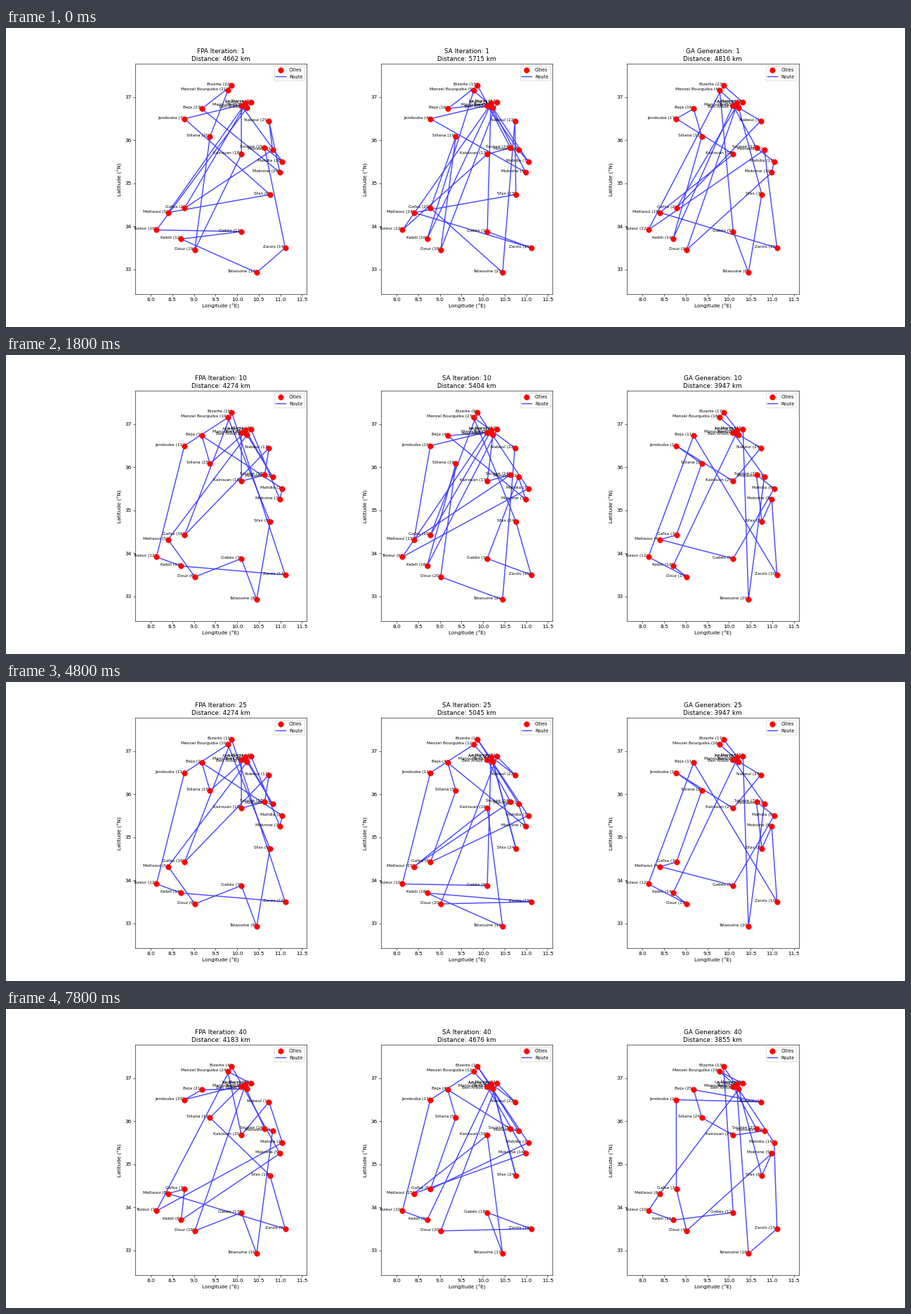
Animation of 1280x427 px, one loop 8000 ms. Source, as a matplotlib script:

```python
import matplotlib.pyplot as plt
from matplotlib.animation import FuncAnimation

STEPS, INTERVAL = 40, 200
DPI = 160 / 3

# key: (name, longitude, latitude)
CITIES = {
    "Tun": ("Tunis", 10.1815, 36.8065),
    "Ari": ("Ariana", 10.1956, 36.8625),
    "Mar": ("La Marsa", 10.3247, 36.8782),
    "Man": ("Manouba", 10.0956, 36.8101),
    "Ben": ("Ben Arous", 10.2300, 36.7531),
    "Biz": ("Bizerte", 9.8739, 37.2744),
    "Men": ("Menzel Bourguiba", 9.7856, 37.1536),
    "Bej": ("Beja", 9.1833, 36.7333),
    "Jen": ("Jendouba", 8.7803, 36.5011),
    "Nab": ("Nabeul", 10.7376, 36.4513),
    "Sil": ("Siliana", 9.3708, 36.0844),
    "Sou": ("Sousse", 10.6369, 35.8256),
    "Mon": ("Monastir", 10.8200, 35.7780),
    "Kai": ("Kairouan", 10.0990, 35.6781),
    "Mah": ("Mahdia", 11.0456, 35.5047),
    "Mok": ("Moknine", 10.9900, 35.2530),
    "Sfa": ("Sfax", 10.7603, 34.7406),
    "Gaf": ("Gafsa", 8.7842, 34.4250),
    "Met": ("Metlaoui", 8.4016, 34.3230),
    "Toz": ("Tozeur", 8.1335, 33.9197),
    "Keb": ("Kebili", 8.7050, 33.7080),
    "Dou": ("Douz", 9.0203, 33.4567),
    "Gab": ("Gabès", 10.0982, 33.8815),
    "Zar": ("Zarzis", 11.1122, 33.5039),
    "Tat": ("Tataouine", 10.4518, 32.9297),
}

# Best tours per solver: (first step, distance in km, visiting order)
FPA = [
    (1, 4662, "Mon Gaf Tun Ari Met Sfa Jen Mar Ben Toz Gab Keb Tat "
              "Zar Sou Mah Man Kai Dou Sil Men Biz Bej Mok Nab"),
    (3, 4479, "Mah Mok Toz Keb Sil Biz Gaf Met Tun Zar Man Sfa Sou "
              "Mon Gab Tat Dou Ari Nab Jen Bej Ben Men Mar Kai"),
    (7, 4274, "Bej Mah Mok Mar Met Dou Gab Tat Sfa Men Jen Toz Keb "
              "Zar Biz Gaf Nab Sou Kai Man Ari Mon Ben Tun Sil"),
    (36, 4183, "Nab Mah Toz Biz Mok Keb Gaf Met Zar Sfa Sil Man Tun "
               "Sou Mon Tat Gab Dou Ari Jen Bej Ben Mar Men Kai"),
]
SA = [
    (1, 5715, "Gab Tun Mok Jen Man Mon Mah Ben Men Keb Ari Toz Kai "
              "Sou Biz Bej Mar Dou Sil Gaf Tat Nab Sfa Met Zar"),
    (3, 5550, "Gab Tun Mok Jen Man Mon Mah Ben Men Keb Ari Toz Kai "
              "Sou Biz Bej Mar Gaf Sil Dou Tat Nab Sfa Met Zar"),
    (7, 5404, "Gab Mon Mok Bej Man Toz Mah Tun Biz Gaf Ari Ben Kai "
              "Sou Met Jen Mar Keb Sil Dou Tat Nab Men Sfa Zar"),
    (16, 5392, "Gab Mon Mok Bej Man Toz Mah Tun Biz Gaf Ari Ben Kai "
               "Sou Met Jen Tat Keb Sil Dou Mar Nab Men Sfa Zar"),
    (24, 5045, "Biz Mon Mok Bej Sil Gaf Mah Tun Gab Toz Jen Men Man "
               "Sou Met Kai Tat Keb Zar Dou Mar Nab Ari Sfa Ben"),
    (36, 4676, "Biz Mon Sou Bej Sil Gaf Mah Tun Keb Toz Jen Men Man "
               "Mok Met Kai Tat Gab Zar Dou Mar Nab Ari Sfa Ben"),
]
GA = [
    (1, 4816, "Nab Gaf Tun Men Gab Tat Sfa Ari Dou Mok Mah Sou Man "
              "Keb Sil Bej Jen Kai Met Zar Mon Toz Biz Mar Ben"),
    (3, 4303, "Biz Ben Bej Sil Tat Gaf Gab Mar Met Toz Keb Sfa Nab "
              "Tun Dou Zar Jen Man Men Ari Sou Mah Kai Mok Mon"),
    (8, 3947, "Jen Sil Gaf Met Gab Mah Sou Sfa Mok Zar Bej Toz Dou "
              "Keb Tun Men Biz Ari Mar Tat Mon Man Ben Nab Kai"),
    (30, 3855, "Nab Jen Gaf Dou Mok Sfa Ari Ben Met Toz Keb Gab Biz "
               "Mah Zar Tat Tun Men Mar Man Sou Mon Kai Sil Bej"),
]

LONS = [c[1] for c in CITIES.values()]
LATS = [c[2] for c in CITIES.values()]


class Panel:
    def __init__(self, ax, heading, tours):
        self.ax, self.heading, self.tours = ax, heading, tours
        ax.scatter(LONS, LATS, c="red", s=100, label="Cities", zorder=5)
        self.line, = ax.plot([], [], "b-", lw=2, alpha=0.7, label="Route")
        self.labels = {key: ax.text(lon, lat, name, fontsize=8, ha="right")
                       for key, (name, lon, lat) in CITIES.items()}
        ax.set_xlim(min(LONS) - 0.5, max(LONS) + 0.5)
        ax.set_ylim(min(LATS) - 0.5, max(LATS) + 0.5)
        ax.set_xticks([8 + 0.5 * i for i in range(8)])
        ax.set_yticks(range(33, 38))
        ax.set_aspect("equal")
        ax.set_xlabel("Longitude (°E)")
        ax.set_ylabel("Latitude (°N)")
        ax.legend(loc="upper right", fontsize=9)

    def show(self, step):
        _, km, order = [t for t in self.tours if t[0] <= step][-1]
        keys = order.split()
        loop = keys + keys[:1]
        self.line.set_data([CITIES[k][1] for k in loop],
                           [CITIES[k][2] for k in loop])
        for rank, key in enumerate(keys, 1):
            self.labels[key].set_text(f"{CITIES[key][0]} ({rank})")
        self.ax.set_title(f"{self.heading}: {step}\nDistance: {km} km")


# The small margin keeps the pixel size from rounding down.
fig, axes = plt.subplots(1, 3, figsize=(1280.01 / DPI, 427.01 / DPI), dpi=DPI)
panels = [Panel(axes[0], "FPA Iteration", FPA),
          Panel(axes[1], "SA Iteration", SA),
          Panel(axes[2], "GA Generation", GA)]


def update(i):
    for panel in panels:
        panel.show(i + 1)
    return []


anim = FuncAnimation(fig, update, frames=STEPS, interval=INTERVAL,
                     init_func=lambda: update(0), repeat=True, blit=False)
plt.show()
```
